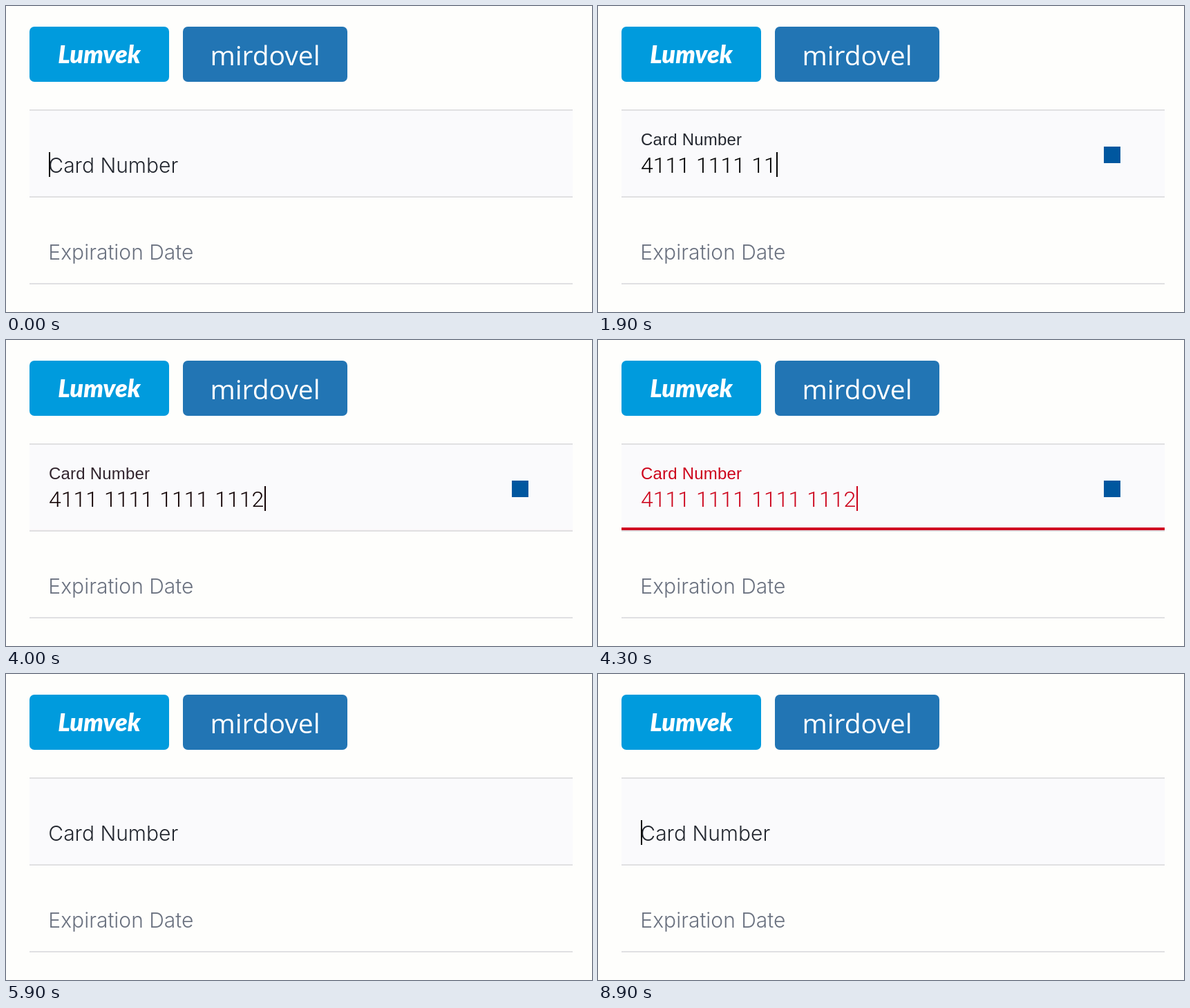
Write an HTML page that moves like this. It is 848x444 px and loops after 9100 ms.

```html
<!DOCTYPE html>
<html lang="en">
<head>
<meta charset="utf-8">
<title>Card form</title>
<style>
  html, body { margin: 0; width: 100%; height: 100%; overflow: hidden; background: #fefefc; }
  svg { display: block; width: 848px; height: 444px; }
  .big { font: 300 30px Inter, "Liberation Sans", sans-serif; font-optical-sizing: none; }
  .small { font-family: "Liberation Sans", Arial, sans-serif; font-weight: 400; letter-spacing: .2px; }
  .digits { font: 300 32px Roboto, "Liberation Sans", sans-serif; }
  .pay { font: italic 900 36px Lato, sans-serif; }
  .coin { font: 400 39px "Open Sans", sans-serif; }
</style>
</head>
<body>
<svg viewBox="0 0 848 444">
  <rect width="848" height="444" fill="#fefefc"/>
  <rect x="34" y="30" width="202" height="80" rx="7" fill="#009bdd"/>
  <text class="pay" x="135" y="83" text-anchor="middle" fill="#fff">Lumvek</text>
  <rect x="256" y="30" width="238" height="80" rx="7" fill="#2275b4"/>
  <text class="coin" x="375" y="86" text-anchor="middle" fill="#fff">mirdovel</text>

  <rect x="34" y="152" width="786" height="124" fill="#fafafc"/>
  <g fill="#e0e0e2">
    <rect x="34" y="150" width="786" height="2"/>
    <rect x="34" y="276" width="786" height="2"/>
    <rect x="34" y="402" width="786" height="2"/>
  </g>
  <rect id="alert" x="34" width="786" fill="#d0021b"/>

  <text id="label">Card Number</text>
  <g id="value" class="digits"></g>
  <rect id="caret" y="212" width="2" height="36"/>
  <rect id="brandA" x="732" y="204" width="24" height="24" fill="#00579f"/>
  <rect id="brandB" x="733" y="204" width="24" height="24" fill="#0690bb"/>

  <text class="big" x="61.3" y="368" fill="#6b7280">Expiration Date</text>
</svg>
<script>
const LOOP = 9100, STEP = 100;
const LEFT = 62, DIGIT = 17.8, GAP = 8.9;
const CARD = '4' + '1'.repeat(15);
const INK = [35, 39, 47], BLACK = [0, 0, 0], RED = [208, 2, 27];

const TYPED = [200, 700, 900, 1000, 1200, 1300, 1400, 1600,
               1700, 1900, 2100, 2200, 2400, 2500, 2700, 2800];
const ERASED = [[5000, 13], [5100, 10], [5200, 6], [5300, 3], [5400, 0]];
const typed15 = CARD.slice(0, 15);

// [time, field value] for every key press
const KEYS = [
  [7900 - LOOP, ''],
  ...TYPED.map((t, i) => [t, CARD.slice(0, i + 1)]),
  [3700, typed15], [4000, typed15 + '2'], [4500, typed15],
  ...ERASED.map(([t, n]) => [t, CARD.slice(0, n)]),
  [6400, '3'], [6900, '37'], [7900, '']
];

// easing sampled once per step
const FOUR = [.1, .5, .9, 1], THREE = [.3, .8, 1], TWO = [.5, 1];
const FIVE = [.08, .45, .85, .98, 1];

// [start, end value, easing]
const FLOAT = [[200, 1, FOUR], [5400, 0, FOUR], [6400, 1, THREE], [7900, 0, FOUR]];
const BRAND_A = [[200, 1, FOUR], [5400, 0, FOUR]];
const BRAND_B = [[6900, 1, TWO], [7900, 0, FOUR]];
const ERROR = [[4000, 1, FIVE], [4500, 0, FOUR]];

const $ = id => document.getElementById(id);
const set = (el, attrs) => {
  for (const k in attrs) el.setAttribute(k, attrs[k]);
};
const lastAt = (rows, t) => rows.filter(r => r[0] <= t).pop();

function track(rows, t) {
  const row = lastAt(rows, t);
  if (!row) return 0;
  const [start, end, ease] = row;
  const p = ease[Math.min((t - start) / STEP, ease.length - 1)];
  return end ? p : 1 - p;
}

const mix = (a, b, p) =>
  `rgb(${a.map((v, i) => Math.round(v + (b[i] - v) * p)).join(',')})`;

const groups = [0, 1, 2, 3].map(i => {
  const el = document.createElementNS('http://www.w3.org/2000/svg', 'text');
  set(el, { x: LEFT + i * (4 * DIGIT + GAP), y: 242 });
  $('value').append(el);
  return el;
});

function caretX(n) {
  const gaps = Math.min(3, Math.floor(n / 4));
  return Math.round(LEFT + n * DIGIT + gaps * GAP);
}

function draw(ms) {
  const t = Math.floor(ms / STEP) * STEP;
  const [pressed, value] = lastAt(KEYS, t);
  const up = track(FLOAT, t), error = track(ERROR, t);
  const ink = mix(BLACK, RED, error);

  groups.forEach((el, i) => { el.textContent = value.slice(i * 4, i * 4 + 4); });
  set($('value'), { fill: ink });
  set($('caret'), {
    x: caretX(value.length),
    fill: ink,
    opacity: (t - pressed) % 1000 < 500 ? 1 : 0
  });

  const label = $('label');
  set(label, {
    class: up ? 'small' : 'big',
    x: up ? LEFT : 61.3,
    y: 242 - 40 * up,
    fill: mix(INK, RED, error)
  });
  label.style.fontSize = (up ? 32 - 8 * up : 30) + 'px';

  set($('alert'), { y: 276 - 4 * error, height: 4 * error, opacity: error });
  set($('brandA'), { opacity: track(BRAND_A, t) });
  set($('brandB'), { opacity: track(BRAND_B, t) });
}

const begin = performance.now();
function tick() {
  draw((performance.now() - begin) % LOOP);
  requestAnimationFrame(tick);
}
tick();
</script>
</body>
</html>
```
